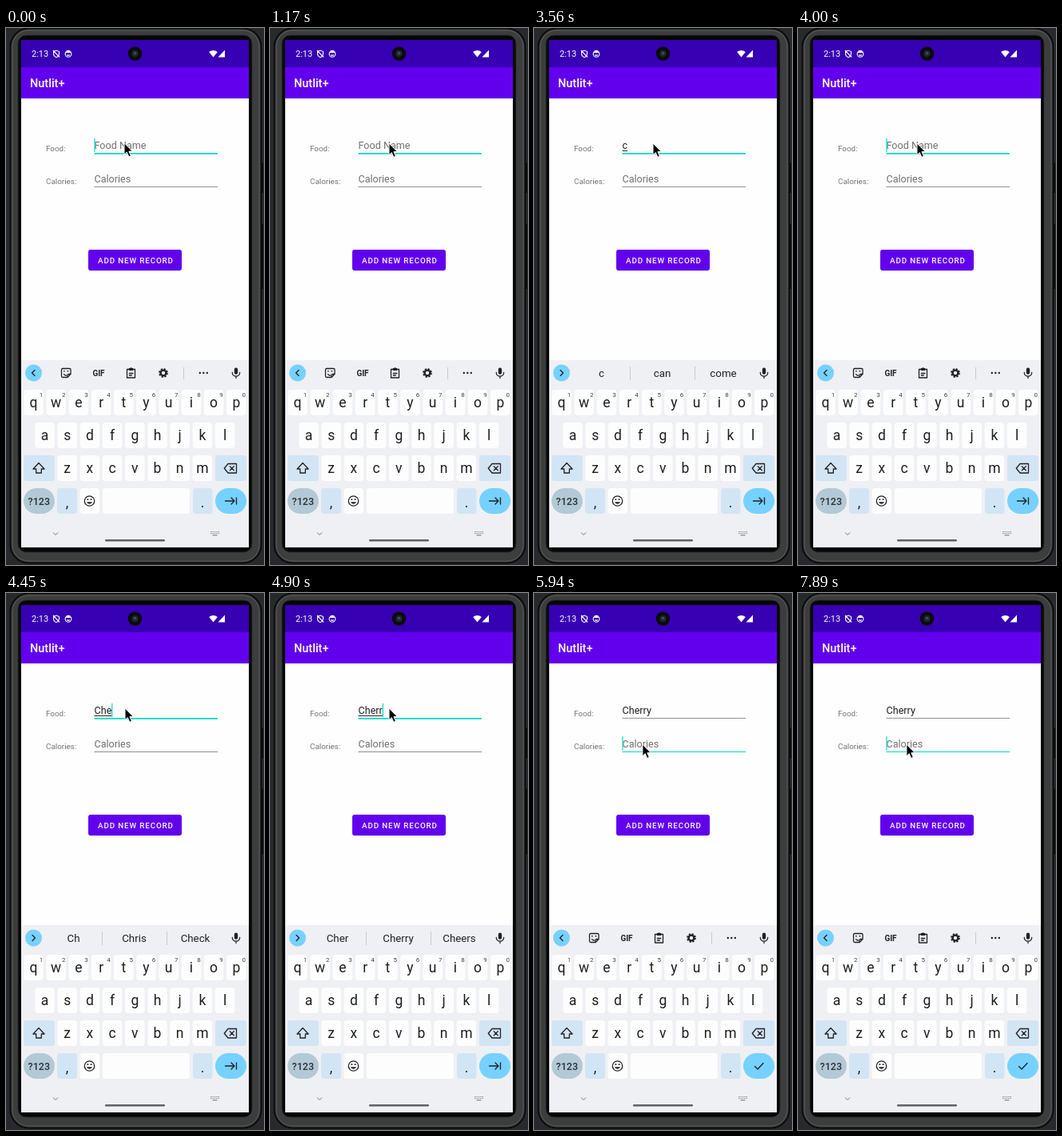
These frames come from a looping animation (323 px wide and 671 px high, 8 s). An HTML page:

```html
<!DOCTYPE html>
<html lang="en">
<head>
<meta charset="utf-8">
<title>Food log</title>
<style>
html, body { margin: 0; width: 100%; height: 100%; overflow: hidden; background: #28292c; }
svg { display: block; width: 323px; height: 671px; font-family: Roboto, sans-serif; }
.line { fill: none; stroke: #202124; stroke-width: 1.3; stroke-linejoin: round; stroke-linecap: round; }
.label { font-size: 9.9px; fill: #747474; }
.input { font-size: 12.6px; }
.key { font-size: 17.5px; fill: #1d1e20; text-anchor: middle; }
.num { font-size: 8px; fill: #3c4043; text-anchor: middle; }
.word { font-size: 13.3px; fill: #1f2023; text-anchor: middle; }
.sep { stroke: #c9cbd0; stroke-width: 1; }
</style>
</head>
<body>
<svg viewBox="0 0 323 671">
  <!-- phone -->
  <rect width="323" height="671" fill="#28292c"/>
  <g fill="#0b0b0c" stroke="#3d3e40" stroke-width=".6">
    <rect x="318" y="168" width="4.5" height="39" rx="1"/>
    <rect x="318" y="244" width="4.5" height="83" rx="1"/>
  </g>
  <rect x="5.5" y="0.5" width="314" height="668" rx="23" fill="#3c3e3e" stroke="#0c0c0d" stroke-width="2"/>
  <rect x="8" y="3" width="309" height="663" rx="20" fill="none" stroke="#585a5a"/>
  <rect x="15" y="9" width="293" height="646" rx="10" fill="#050505" stroke="#2a2b2b"/>
  <rect x="19" y="15" width="285" height="634" fill="#fefefe"/>
  <rect x="19" y="15" width="285" height="34" fill="#3700b3"/>
  <rect x="19" y="49" width="285" height="39" fill="#6200ee"/>
  <rect x="19" y="415" width="285" height="234" fill="#eff0f3"/>

  <!-- status bar and title -->
  <g fill="#fff">
    <text x="32" y="36" font-size="11">2:13</text>
    <path d="M259.500 36.500l-5.300-6.600a8.500 8.500 0 0 1 10.600 0zM265.500 36.500h8.500v-9z"/>
    <path d="M74.500 31a4 4 0 0 1 7 0z"/>
    <text x="30" y="74" font-size="14.5" font-weight="500">Nutlit+</text>
  </g>
  <g fill="none" stroke="#fff" stroke-width="1.1">
    <path d="M59.500 29.500l3.500-1.500 3.500 1.500v2.500q0 3.300-3.500 4.700-3.500-1.400-3.500-4.700zM59 28l8 8.500"/>
    <circle cx="78" cy="32.3" r="3.9"/>
    <path d="M76.300 33.500q1.700 1.600 3.400 0"/>
  </g>
  <circle cx="161.5" cy="32" r="8.8" fill="#0b0b0c"/>
  <circle cx="161.5" cy="32" r="4" fill="#20282b"/>
  <circle cx="161.5" cy="31.5" r="1.6" fill="#46524f"/>

  <!-- form -->
  <text class="label" x="50" y="154">Food:</text>
  <text class="label" x="50" y="195">Calories:</text>
  <text class="input" id="food" x="110.5" y="151.3"/>
  <text class="input" x="110.5" y="193" fill="#707070">Calories</text>
  <rect id="compose" x="110.5" y="153" height="1" fill="#222"/>
  <rect id="foodLine" x="110.5" width="154.5"/>
  <rect id="calLine" x="110.5" width="154.5"/>
  <rect id="caret" width="1.2" height="17" fill="#03dac5"/>
  <rect x="103" y="277.8" width="117" height="26" rx="3.5" fill="#000" opacity=".12"/>
  <rect x="103" y="277" width="117" height="26" rx="3" fill="#6200ee"/>
  <text x="115" y="294" font-size="9.8" font-weight="500" letter-spacing=".87" fill="#fff">ADD NEW RECORD</text>

  <!-- keyboard strip -->
  <circle cx="34.5" cy="431" r="10.5" fill="#76d1ff"/>
  <path id="chevron" class="line"/>
  <g id="tools">
    <path class="line" d="M71 425.500h8.500q1.500 0 1.500 1.500v5.500l-4 4h-6q-1.500 0-1.500-1.500v-8q0-1.500 1.500-1.500zM81 432.500h-2.500q-1.500 0-1.500 1.500v2.500M72.500 432.500q1 1.700 3 1.500"/>
    <path d="M72 428h1.600v1.600h-1.600zM76.600 428h1.600v1.600h-1.600z" fill="#202124"/>
    <text x="116" y="434.5" font-size="10" font-weight="700" text-anchor="middle" fill="#202124">GIF</text>
    <path class="line" d="M151.500 426.500h10v10.500h-10zM154.300 431.500h4.500M154.300 434h3"/>
    <path d="M153.800 425h1.400a1.500 1.500 0 0 1 2.600 0h1.400v3h-5.400z" fill="#202124"/>
    <g fill="none" stroke="#202124">
      <circle cx="197" cy="431" r="3.4" stroke-width="2.4"/>
      <circle cx="197" cy="431" r="5.1" stroke-width="1.6" stroke-dasharray="2.3 1.705"/>
    </g>
    <path class="sep" d="M222.500 424v15"/>
    <g fill="#202124">
      <circle cx="242.8" cy="431" r="1.2"/><circle cx="247.3" cy="431" r="1.2"/><circle cx="251.8" cy="431" r="1.2"/>
    </g>
  </g>
  <g id="words">
    <path class="sep" d="M120.500 423v17M201.500 423v17"/>
    <text class="word" x="84.5" y="436"/>
    <text class="word" x="160.5" y="436"/>
    <text class="word" x="237" y="436"/>
  </g>
  <g id="emoji">
    <path class="sep" d="M237.500 423v17"/>
    <g id="flower"></g>
    <path d="M252.500 433q1-6 3-8 2.500 3 3 8.500" fill="none" stroke="#5d8a2c"/>
    <path d="M255 425q3-2 6 .8-3 2.200-6-.8z" fill="#5e9b34"/>
    <circle cx="252.8" cy="433.8" r="2.9" fill="#d91f2f"/>
    <circle cx="258.3" cy="434.8" r="2.9" fill="#c91428"/>
  </g>
  <rect x="285.8" y="424.5" width="4.4" height="8.3" rx="2.2" fill="#202124"/>
  <path class="line" d="M283.300 430.500a4.700 4.700 0 0 0 9.400 0M288 435.500v2"/>

  <!-- keys -->
  <g id="keys"></g>
  <path class="line" d="M41 543.500l-7 7.500h3.700v5h6.600v-5h3.700zM278 544.500h10.500v11.500h-10.500l-4.700-5.750zM280.300 547.800l5 5M285.300 547.800l-5 5"/>
  <circle class="line" cx="104.5" cy="591" r="6.2"/>
  <path d="M101.500 588.300h1.800v1.800h-1.800zM105.700 588.300h1.800v1.800h-1.800zM101 592.300h7a3.600 3.200 0 0 1-7 0z" fill="#202124"/>
  <text x="41.3" y="595.5" font-size="12.5" font-weight="500" text-anchor="middle" fill="#263238">?123</text>
  <path id="enter" class="line"/>
  <path d="M59 630.500l3 3 3-3" fill="none" stroke="#777a7e"/>
  <rect x="124" y="639" width="75" height="2.4" rx="1.2" fill="#606165"/>
  <path d="M256 629.500h11M256 631.500h11" stroke="#85888c" stroke-width="1.2" stroke-dasharray="1.4 1"/>
  <path d="M258.500 633.700h6" stroke="#85888c" stroke-width="1.2"/>

  <path id="mouse" d="M0 0V14.500L3.300 11.500 5.800 17.200 8.400 16.100 5.900 10.500H10.400Z" fill="#000" stroke="#fff" stroke-linejoin="round"/>
</svg>
<script>
const $ = id => document.getElementById(id);
const LOOP = 8000, TEAL = "#03dac5", GREY = "#858585";

// Keyboard
const key = (x, y, w, fill, r = 4) =>
  `<rect x="${x}" y="${y}" width="${w}" height="32" rx="${r}" fill="${fill}"/>`;
const letter = (x, y, c) => `<text class="key" x="${x}" y="${y}">${c}</text>`;
const WHITE = "#fdfdfe", PALE = "#d2e5f4";
let keys = "";
[["qwertyuiop", 34.5, 452], ["asdfghjkl", 48.5, 493], ["zxcvbnm", 76.7, 534]].forEach(([row, x0, y], r) => {
  [...row].forEach((c, i) => {
    const x = x0 + 28.2 * i;
    keys += key(x - 12.3, y, 24.6, WHITE) + letter(x, y + 22, c);
    if (!r) keys += `<text class="num" x="${x + 9.5}" y="461">${(i + 1) % 10}</text>`;
  });
});
keys += key(22, 534, 39, PALE) + key(262, 534, 39, PALE) +
  key(22, 575, 39, "#b4c9d6", 16) + key(64, 575, 25, PALE) +
  key(92.5, 575, 24.6, WHITE) + key(121, 575, 109, WHITE) +
  key(234, 575, 24.5, PALE) + key(262, 575, 39, "#76d1ff", 16) +
  letter(76.5, 599, ",") + letter(246, 599, ".");
$("keys").innerHTML = keys;

let petals = "";
for (let i = 0; i < 5; i++)
  petals += `<ellipse cx="220" cy="427.8" rx="2.7" ry="3.4" fill="#f8abc9" transform="rotate(${72 * i} 220 431.5)"/>`;
$("flower").innerHTML = petals + '<circle cx="220" cy="431.5" r="1.9" fill="#e0588b"/>';

// Each track is a list of [time, value] holding until the next entry
const typed = [[0, ""], [2960, "c"], [3850, ""], [4150, "C"], [4300, "Ch"], [4450, "Che"],
  [4750, "Cher"], [4900, "Cherr"], [5050, "Cherry"]];
const strip = [[0, ""], [2960, "c can come"], [4000, ""], [4300, "C Can Come"], [4450, "Ch Chris Check"],
  [4750, "Che Check Chef"], [4900, "Cher Cherry Cheers"], [5050, "Cherry Cheery"], [5940, ""]];
const blink = [0, 300, 750, 1170, 1770, 2220, 2810, 3560, 3850, 6390, 6990, 7440, 7890]
  .map((t, i) => [t, i % 2 === 0]);
const pointer = [[0, [148, 143.6]], [150, [148.5, 143.9]], [300, [149, 144.1]],
  [5200, [143, 166]], [5350, [136.8, 189.2]], [5500, [136.3, 189.2]], [5650, [135.9, 189.2]]];
const at = (track, t) => track.filter(e => e[0] <= t).pop()[1];

const set = (id, attrs) => { for (const k in attrs) $(id).setAttribute(k, attrs[k]); };
const show = (id, on) => set(id, { visibility: on ? "visible" : "hidden" });
const rule = (id, y, focused, h) => set(id, { y, height: focused ? h : .9, fill: focused ? TEAL : GREY });
const words = [...$("words").querySelectorAll("text")];
const food = $("food");

function draw(t) {
  const text = at(typed, t), hints = at(strip, t), second = t >= 5790, done = t >= 5940;
  food.textContent = text || "Food Name";
  set("food", { fill: text ? "#1f1f1f" : "#707070" });
  const width = text ? food.getComputedTextLength() : 0;
  set("compose", { width: done ? 0 : width });
  rule("foodLine", 156, !second, 1.8);
  rule("calLine", 198, second, 1);
  set("caret", { x: second ? 110.4 : 110.4 + width, y: second ? 179 : 138 });
  show("caret", at(blink, t));

  const list = hints.split(" ");
  words.forEach((w, i) => w.textContent = list[i] || "");
  show("tools", !hints);
  show("words", hints);
  show("emoji", hints && list.length === 2);
  set("chevron", { d: hints ? "M33 427.5l3.5 3.5-3.5 3.5" : "M36 427.5l-3.5 3.5 3.5 3.5" });
  set("enter", { d: done ? "M276.5 591.5l3.5 3.5 7-7.5" : "M274.5 591h11M282 587l4 4-4 4M288.5 587v8" });
  set("mouse", { transform: `translate(${at(pointer, t)})` });
}

function tick() {
  draw(performance.now() % LOOP);
  requestAnimationFrame(tick);
}
tick();
</script>
</body>
</html>
```
